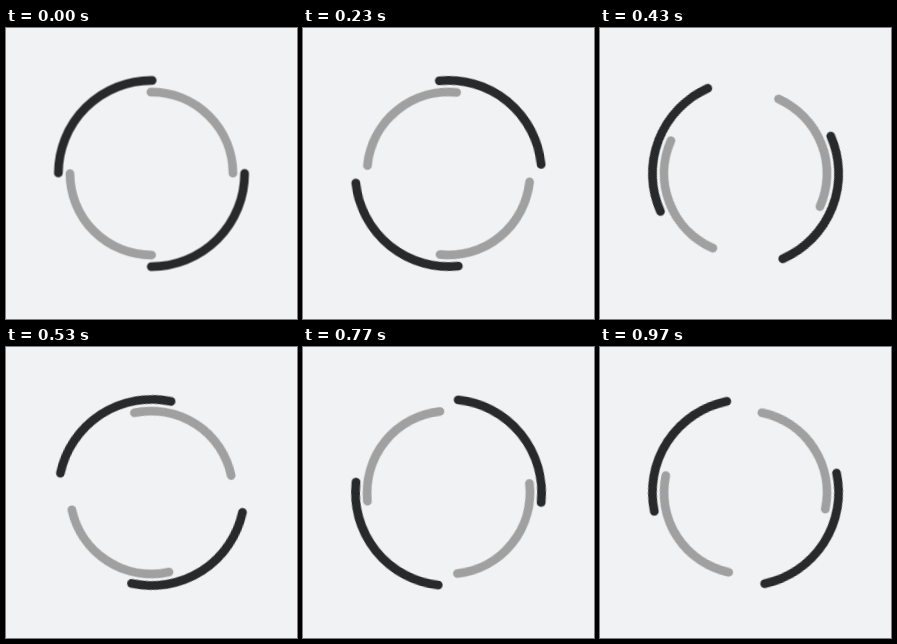
Write an HTML page without scripts that moves like this. It is 291 px wide and 291 px high and loops after 1 s.

```html
<!DOCTYPE html>
<html lang="en">
<head>
<meta charset="utf-8">
<title>Double ring spinner</title>
<style>
  html, body {
    margin: 0;
    width: 100%;
    height: 100%;
    overflow: hidden;
    background: #f1f2f3;
  }
  svg {
    display: block;
    width: 100%;
    height: 100%;
  }
  circle {
    fill: none;
    stroke-width: 3;
    stroke-linecap: round;
    stroke-dasharray: 1 1;
  }
  .outer { stroke: #28292b; stroke-dasharray: 50.265; }
  .inner { stroke: #a0a0a0; stroke-dasharray: 43.982; }

  /* 30 ticks of 12deg: ten coarse turns, each split into three fine ones */
  .turn { animation: turn 1s steps(10) -1ms infinite; }
  .tick { animation: tick 100ms step-end -1ms infinite; }
  @keyframes turn {
    to { transform: rotate(360deg); }
  }
  @keyframes tick {
    0% { transform: rotate(0deg); }
    30% { transform: rotate(12deg); }
    70%, 100% { transform: rotate(24deg); }
  }
</style>
</head>
<body>
<svg viewBox="-50 -50 100 100">
  <g class="turn"><g class="tick">
    <circle class="outer" r="32"/>
  </g></g>
  <!-- mirrored, so it spins the other way -->
  <g transform="scale(-1 1)">
    <g class="turn"><g class="tick">
      <circle class="inner" r="28"/>
    </g></g>
  </g>
</svg>
</body>
</html>
```
